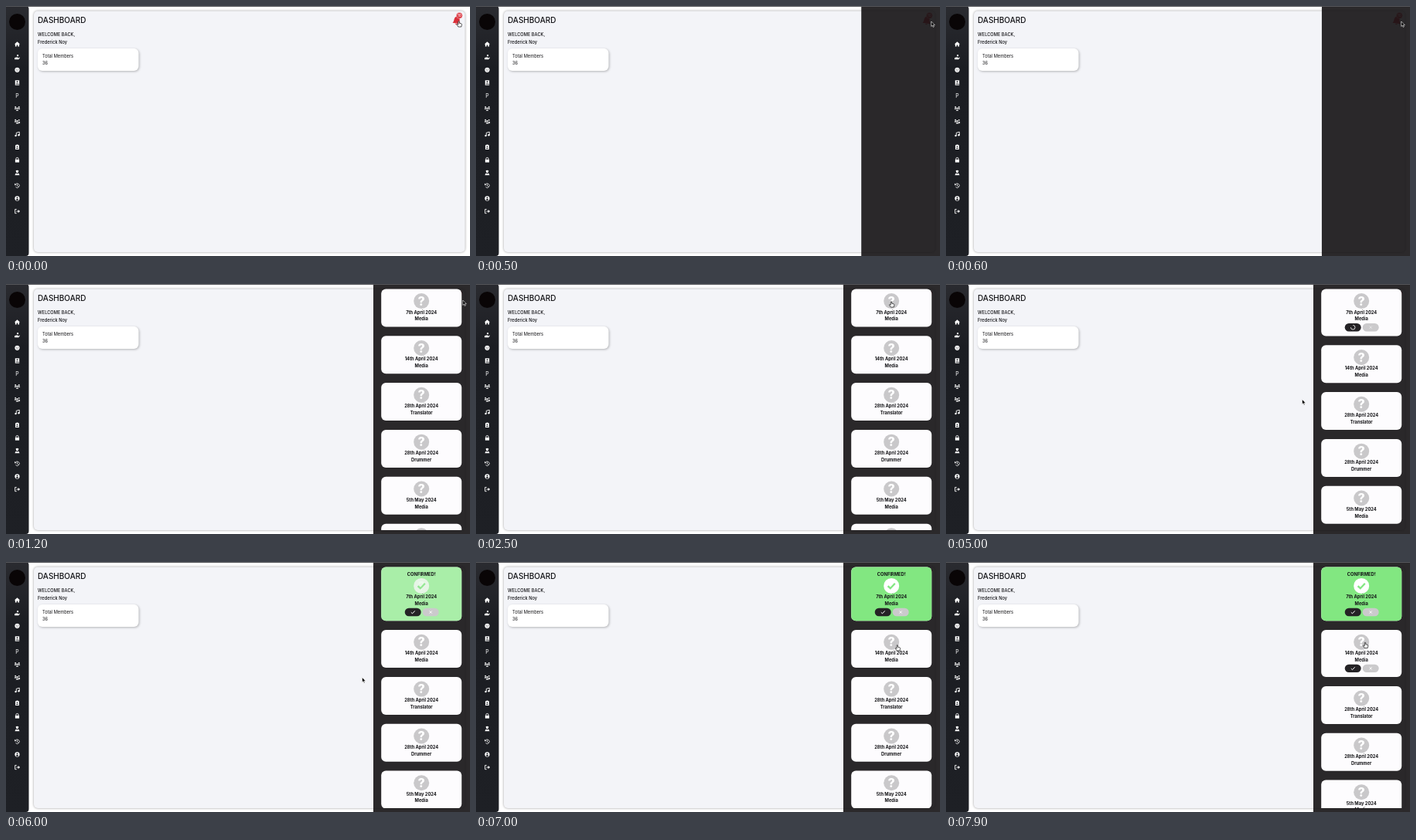
Write an HTML page that moves like this. It is 600 px wide and 324 px high and loops after 8 s.

```html
<!DOCTYPE html>
<html lang="en">
<head>
<meta charset="utf-8">
<title>Dashboard</title>
<style>
  html, body { margin: 0; width: 100%; height: 100%; overflow: hidden; background: #fff; }
  svg { display: block; width: 100vw; height: 100vh; }
  text { font-family: Inter, Roboto, sans-serif; fill: #111114; }
  .body { font-size: 5.7px; font-weight: 500; }
  .bold { font-size: 5.75px; font-weight: 700; text-anchor: middle; }
  .mark { font-size: 16px; font-weight: 800; text-anchor: middle; fill: #fff; }
  .line { fill: none; stroke: #fff; }
  .main { filter: drop-shadow(0 0.5px 1.5px #0006); }
  .tile { filter: drop-shadow(1px 1.5px 1.5px #0004); }
</style>
</head>
<body>
<svg viewBox="0 0 600 324">
  <defs>
    <linearGradient id="night" x2="0" y2="1">
      <stop stop-color="#2a2b30"/><stop offset=".25" stop-color="#1b1d22"/><stop offset="1" stop-color="#1e2025"/>
    </linearGradient>
    <clipPath id="view"><rect x="475" width="125" height="319"/></clipPath>
  </defs>
  <rect width="600" height="324" fill="#fff"/>
  <rect class="main" x="36" y="6.5" width="557.5" height="312.5" rx="5" fill="#f3f4f8"/>
  <text x="41" y="22.3" font-size="10" font-weight="500">DASHBOARD</text>
  <text class="body" x="41" y="39.2">WELCOME BACK,</text>
  <text class="body" x="41" y="49">Frederick Noy</text>
  <rect class="tile" x="41" y="55" width="130.5" height="29" rx="6" fill="#fff"/>
  <text class="body" x="47" y="67.2" style="font-weight:400">Total Members</text>
  <text class="body" x="47" y="76" style="font-weight:400">36</text>

  <g transform="translate(583 18.5) rotate(8)" fill="#d9303a">
    <path d="M-5 4Q-3.6 2.6-3.6-.5Q-3.4-4.5 0-5Q3.4-4.5 3.6-.5Q3.6 2.6 5 4ZM-1.5 4.7H1.5Q0 6.8-1.5 4.7Z"/>
  </g>
  <circle cx="586.3" cy="12.3" r="3.9" fill="#d9303a" stroke="#fff" stroke-width=".4"/>
  <text x="586.3" y="14" font-size="4.6" font-weight="600" text-anchor="middle" style="fill:#fff">10</text>

  <path d="M0 0H26Q29.5 0 29.5 4V320Q29.5 324 26 324H0Z" fill="url(#night)"/>
  <circle cx="14.5" cy="20.5" r="10.5" fill="#090506"/>
  <g id="menu" fill="#fff"></g>

  <rect id="panel" y="0" width="125" height="324" fill="#141214" fill-opacity=".9"/>
  <g id="cards" clip-path="url(#view)"></g>
  <rect width="600" height="1" fill="#55565a"/>
  <g id="cursor" stroke-linejoin="round">
    <path id="arrow" d="M0 0V6.4L1.5 5.1 2.5 7.4 3.6 6.9 2.6 4.7H4.6Z" fill="#000" stroke="#fff" stroke-width=".6"/>
    <path id="hand" d="M-.7.5Q0-.5.7.5V2.7L3.3 3.4Q4 3.8 3.8 5L3.2 7.5H-.7L-2.6 4.6Q-2.4 3.6-1.4 4.2L-.7 4.8Z" fill="#fff" stroke="#111" stroke-width=".7"/>
  </g>
</svg>
<script>
const LOOP = 8000;
const $ = id => document.getElementById(id);
const dot = (x, y, r, fill = '#fff') => `<circle cx="${x}" cy="${y}" r="${r}" fill="${fill}"/>`;
const path = (d, fill = '#fff') => `<path d="${d}" fill="${fill}"/>`;
const line = (d, w = 1, stroke = '#fff') =>
  `<path class="line" d="${d}" stroke-width="${w}" style="stroke:${stroke}"/>`;
const ink = '#1b1d22';
const bust = (x, y, s) => dot(x, y - s, s) + path(`M${x - 1.7 * s} ${y + 2 * s}Q${x} ${y - s} ${x + 1.7 * s} ${y + 2 * s}Z`);

// Sidebar icons, each drawn around its own centre
const icons = [
  path('M-3.6.1L0-3.2 3.6.1H2.6V3H.8V1H-.8V3H-2.6V.1Z'),
  dot(.6, -2, 1.1) + path('M-3.4 3V1.2L-1.5.4H1V1.3H1.8L3.2.3 3.6.9 1.8 3Z'),
  dot(0, 0, 3.1) + dot(-1.1, -.7, .5, ink) + dot(1.1, -.7, .5, ink) + line('M-1.4.9Q0 2.2 1.4.9', .5, ink),
  path('M-2.7-3.2H2.7V3.2H-2.7Z') + dot(0, -1.3, .9, ink) + line('M-1.5.8H1.5M-1.8 2.1H2.7', .6, ink),
  '<text y="2.5" font-size="7" text-anchor="middle" style="fill:#fff">P</text>',
  bust(-2.3, -.9, .9) + bust(2.3, -.9, .9) + bust(0, .8, 1.1),
  bust(-2.3, -.8, .9) + bust(0, .8, 1.1) + dot(2.3, -1.6, .9) + dot(2.4, 1.6, 1.3) + dot(2.4, 1.6, .5, ink),
  dot(-2, 2, 1.2) + dot(2, 1.2, 1.2) + line('M-1.2 2V-1.8L2.8-2.9V1.2', .9),
  path('M-2.4-2.6H2.4V3.2H-2.4ZM-.9-3.3H.9V-2H-.9Z') + dot(0, -.4, .8, ink) + line('M-1.3 1.7H1.3', .9, ink),
  path('M-2.6-.4H2.6V3.2H-2.6Z') + line('M-1.6 0V-1.4A1.6 1.6 0 0 1 1.6-1.4V0', .9),
  path('M-1.8-2.9Q0-3.7 1.8-2.9L1.4-.5Q0 .7-1.4-.5ZM-3 3.2Q-2.6.4-1 .6L0 1.6 1 .6Q2.6.4 3 3.2Z'),
  line('M-2.3-1.4A2.7 2.7 0 1 1-2 1.8M0-1.5V.2L1.2 1', .8) + path('M-3.3-3V-.5H-.9Z'),
  dot(0, 0, 3.1) + dot(0, -.9, 1, ink) + path('M-1.9 1.9Q0-.7 1.9 1.9Q0 3.1-1.9 1.9Z', ink),
  line('M-.8-2.6H-2.8V2.6H-.8M-1 0H2.6', .9) + path('M1.2-2.1L3.6 0 1.2 2.1Z')
];
$('menu').innerHTML = icons.map((s, i) => `<g transform="translate(14.5 ${49.5 + i * 16.66})">${s}</g>`).join('');

const duties = [['7th April 2024', 'Media'], ['14th April 2024', 'Media'], ['28th April 2024', 'Translator'],
  ['28th April 2024', 'Drummer'], ['5th May 2024', 'Media'], ['12th May 2024', 'Media']];
$('cards').innerHTML = duties.map(([date, role]) => `<g>
  <rect class="box" x="-52" width="104" rx="6" fill="#fdfcfe"/>
  <rect class="box green" x="-52" width="104" rx="6" fill="#82e781"/>
  <text class="bold title" y="12.1">CONFIRMED!</text>
  <g class="inner">
    <g class="ask">${dot(0, 15.7, 10, '#c9c8ca')}<text class="mark" y="21.4">?</text></g>
    <g class="done">${dot(0, 15.7, 10)}${line('M-4.6 15.9L-1.4 19 4.6 12.6', 2.3, '#82e781')}</g>
    <text class="bold" y="32.2">${date}</text>
    <text class="bold" y="40.8">${role}</text>
    <g class="buttons">
      <rect x="-21.5" y="44.6" width="21" height="10.4" rx="5.2" fill="#252326"/>
      <rect x="1.5" y="44.6" width="21" height="10.4" rx="5.2" fill="#cbcacc"/>
      <g class="tick">${line('M-13.4 50L-11.7 51.6-8.5 48.2', 1)}</g>
      <g class="spin">${line('M0-2.8A2.8 2.8 0 1 1-2.8 0', .8)}</g>
      <g class="cross">${line('M10.4 48.2L13.6 51.4M13.6 48.2L10.4 51.4', .9)}</g>
    </g>
  </g></g>`).join('');
const cards = [...$('cards').children].map(g => {
  const part = name => g.querySelector('.' + name);
  return { g, boxes: g.querySelectorAll('.box'), green: part('green'), title: part('title'), inner: part('inner'),
    ask: part('ask'), done: part('done'), buttons: part('buttons'), tick: part('tick'), spin: part('spin'), cross: part('cross') };
});

const ramp = (t, from, to) => Math.min(1, Math.max(0, (t - from) / (to - from)));
const smooth = u => u * u * (3 - 2 * u);
const easeOut = u => 1 - (1 - u) ** 2;
const move = (el, x, y, more = '') => el.setAttribute('transform', `translate(${x} ${y})${more}`);
const fade = (el, value) => el.setAttribute('opacity', value);

// Cursor tip: time, x, y
const route = [[0, 585.5, 19.5], [100, 585.5, 19.5], [400, 588.7, 20], [950, 588.7, 20], [1200, 590.7, 21],
  [1400, 595, 53], [1750, 595, 53], [2500, 537, 22.5], [3550, 537, 22.5], [4000, 526, 54], [4200, 526, 54],
  [4400, 518, 107], [4700, 460.5, 149.5], [6700, 460.5, 149.5], [7000, 544.8, 107.5], [7500, 542, 104], [LOOP, 542, 104]];
function cursorAt(t) {
  const i = route.findIndex(k => k[0] > t);
  const [a, b] = [route[i - 1], route[i]];
  const u = smooth(ramp(t, a[0], b[0]));
  return [a[1] + (b[1] - a[1]) * u, a[2] + (b[2] - a[2]) * u];
}

function draw(t) {
  $('panel').setAttribute('x', 600 - 125 * easeOut(ramp(t, 80, 820)));
  fade($('cards'), t >= 780 ? 1 : 0);
  const open = [smooth(ramp(t, 2730, 3000)), smooth(ramp(t, 7630, 7900))];
  const grow = easeOut(ramp(t, 5350, 5900));
  const tint = smooth(ramp(t, 5350, 6400));
  const busy = t >= 4200 && t < 5350;
  let y = 6.4;
  cards.forEach((c, i) => {
    const first = i === 0, e = open[i] || 0;
    const k = first ? grow : 0, g = first ? tint : 0;
    const height = 49 + 12 * e + 8.8 * k;
    move(c.g, 537.2, y);
    c.boxes.forEach(b => b.setAttribute('height', height));
    move(c.inner, 0, 8.8 * k);
    fade(c.green, g);
    fade(c.title, k);
    fade(c.ask, 1 - g);
    fade(c.done, g);
    fade(c.buttons, e);
    fade(c.tick, first && busy ? 0 : 1);
    fade(c.spin, first && busy ? 1 : 0);
    fade(c.cross, first && busy ? .5 : 1);
    move(c.spin, -11, 49.8, ` rotate(${(t - 5000) * .36})`);
    y += height + 11.85;
  });
  move($('cursor'), ...cursorAt(t));
  const hand = t < 200 || (t > 2150 && t < 4330) || t > 6850;
  fade($('hand'), hand ? 1 : 0);
  fade($('arrow'), hand ? 0 : 1);
}

const start = performance.now();
(function tick() {
  draw((performance.now() - start) % LOOP);
  requestAnimationFrame(tick);
})();
</script>
</body>
</html>
```
